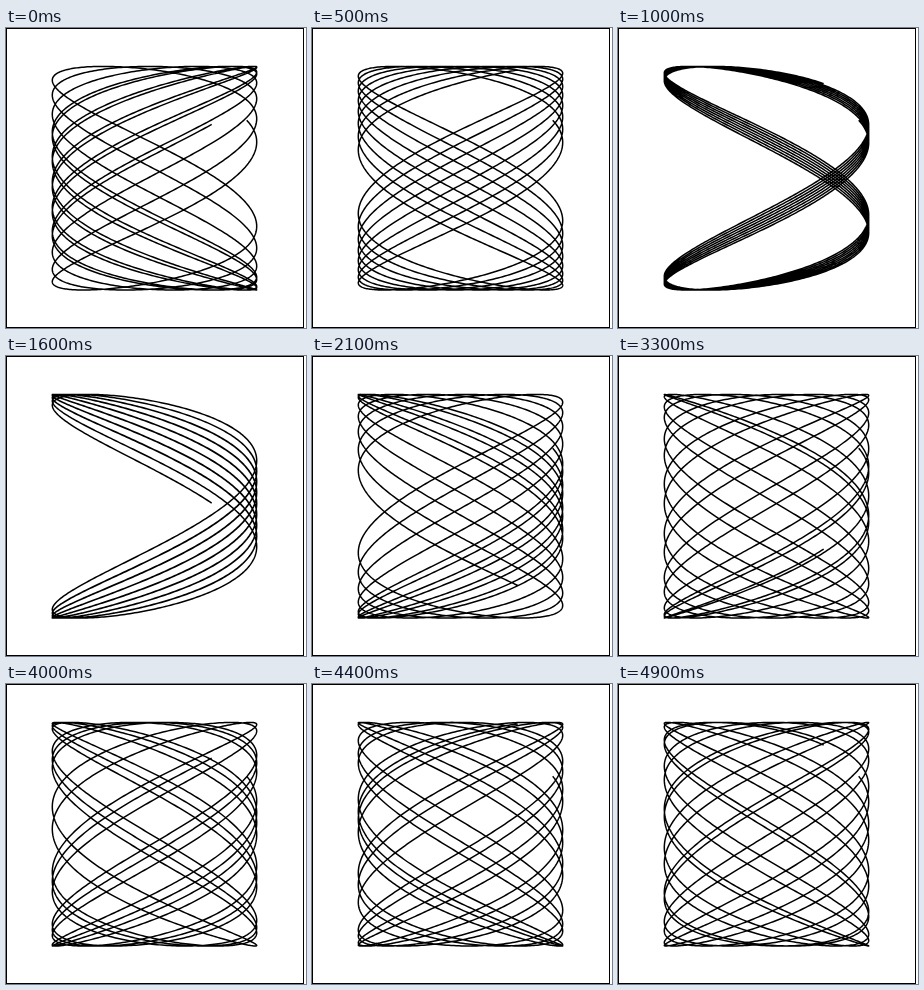
An HTML page with a canvas that plays this animation: 300x300 px, repeating every 5 s.

```html
<!DOCTYPE html>
<html lang="en">
<head>
<meta charset="utf-8">
<title>Lissajous sweep</title>
<style>
  html, body { margin: 0; width: 100%; height: 100%; overflow: hidden; background: #fff; }
  canvas { display: block; width: 300px; height: 300px; }
</style>
</head>
<body>
<canvas id="stage" width="300" height="300"></canvas>
<script>
const ctx = document.getElementById('stage').getContext('2d');

const LOOP = 5000, STEP = 100, STEPS = LOOP / STEP;
const CENTER = { x: 148.5, y: 150.2 };
const RADIUS = { x: 102.2, y: 111.8 };
const PHASE = { x: -0.446, y: 2.597 };
const LENGTH = 100, RES = 0.025;
const RATIO_START = 0.4817, RATIO_SPAN = 0.08;

function drawBorder() {
  ctx.fillStyle = '#000';
  ctx.fillRect(0, 0, 298, 1);
  ctx.fillRect(0, 299, 298, 1);
  ctx.fillRect(0, 0, 1, 300);
  ctx.fillRect(297, 0, 1, 300);
}

function drawCurve(ratio) {
  ctx.beginPath();
  for (let i = 0; i <= LENGTH / RES; i++) {
    const t = i * RES;
    ctx.lineTo(
      CENTER.x + RADIUS.x * Math.cos(t + PHASE.x),
      CENTER.y - RADIUS.y * Math.sin(ratio * t + PHASE.y)
    );
  }
  ctx.strokeStyle = '#000';
  ctx.lineWidth = 1.5;
  ctx.lineJoin = 'round';
  ctx.stroke();
}

function render(step) {
  ctx.fillStyle = '#fff';
  ctx.fillRect(0, 0, 300, 300);
  drawBorder();
  drawCurve(RATIO_START + RATIO_SPAN * step / (STEPS - 1));
}

const start = performance.now();
let shown = -1;

function tick() {
  const step = Math.floor((performance.now() - start) % LOOP / STEP);
  if (step !== shown) render(shown = step);
  requestAnimationFrame(tick);
}
tick();
</script>
</body>
</html>
```
